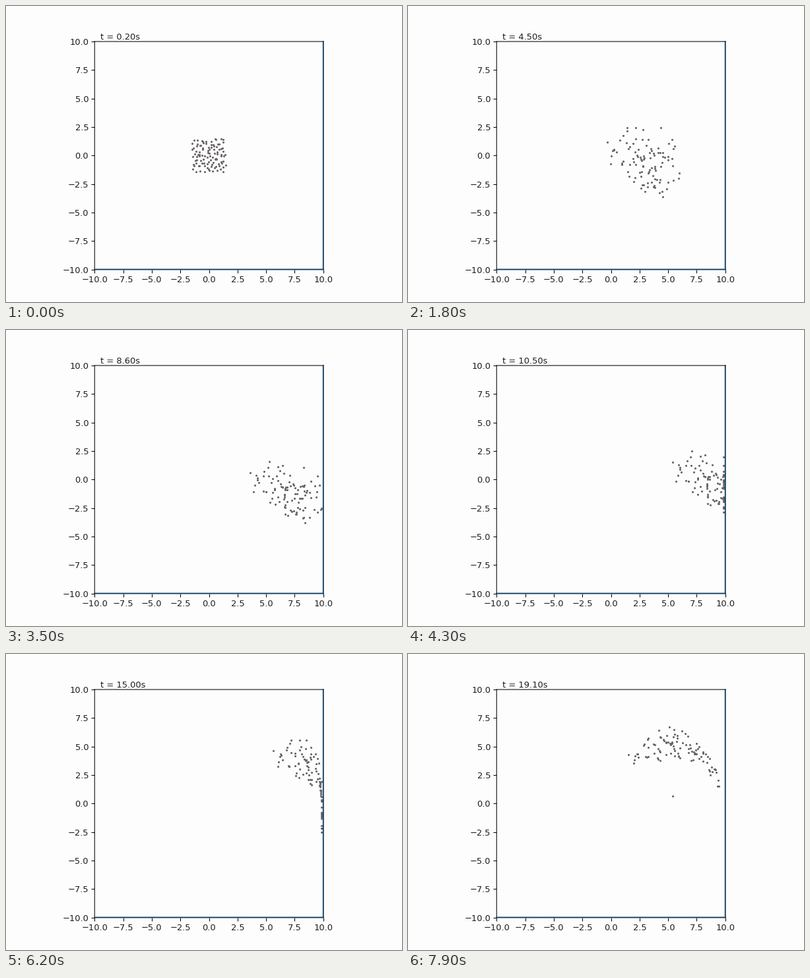
Recreate the animation shown at these times as a matplotlib script. Size 600 by 450 pixels, loop 8 s.

```python
import numpy as np
import matplotlib.pyplot as plt
from matplotlib.animation import FuncAnimation

FRAMES, INTERVAL = 80, 100
SIDE = 10          # birds start on a SIDE x SIDE jittered grid
WALL = 9.86
KEYS = np.array([0.2, 2.1, 6.9, 8.7, 10.5, 12.9, 14.9, 17.0, 19.1])


def xy(x, y):
    return np.stack([x, y], axis=1)


def make_poses(seed=12):
    """Flock position at each key time: burst, drift, hit the wall, peel off."""
    rng = np.random.default_rng(seed)
    n = SIDE * SIDE

    # Square block that bursts outwards
    g = np.linspace(-1.32, 1.32, SIDE)
    start = np.stack(np.meshgrid(g, g), axis=-1).reshape(-1, 2)
    start += rng.uniform(-0.14, 0.14, (n, 2))
    ang = rng.uniform(0, 2 * np.pi, n)
    rad = 1.5 * rng.random(n) ** 0.4
    q = (start + xy(rad * np.cos(ang), rad * np.sin(ang))) * [0.95, 1.27]
    burst = q + [1.0, -0.1]

    # Drift to the right, slightly sheared
    qx, qy = q.T
    noise = rng.normal(0, 0.18, (n, 2))
    drift = xy(5.1 + 1.25 * qx, -0.75 + 0.8 * qy - 0.25 * qx) + noise
    dip = drift + [1.8, -0.25]
    hit = drift + [3.5, 0.65]

    # The front sticks to the wall, the rest turns upwards
    stuck = hit[:, 0] > 9.45
    hx, hy = hit.T
    x = np.where(stuck, 10.1, 8.6 + 0.7 * (hx - 7.8))
    y = np.where(stuck, hy + 0.15 * (hy + 2.5), hy + 1.8)
    turn = xy(x, y)

    # Free birds fly off to the upper left, stuck ones trail behind
    a, b = (qx + 0.8) / 1.5, qy / 2.6
    f = np.clip((y + 2.5) / 5.5, 0, 1)
    free = xy(6.2 + 2.2 * a - 0.3 * b, 4.5 + 1.8 * b + 0.2 * a)
    tail = xy(9.9 - 2 * f**2 - rng.exponential(0.4, n),
              -0.8 + 5.8 * f**0.7 + rng.normal(0, 0.25, n))
    away = np.where(stuck[:, None], tail, free)
    peel = np.where(
        stuck[:, None],
        xy(9.95 - 0.6 * f**2, y + (0.15 + 0.3 * f) * (tail[:, 1] - y)),
        (turn + free) / 2 + [0.55, 0.35],
    )

    # Heading swings round along the arc
    k = away[:, 0] - away[:, 1] / 2
    head = np.radians(196 - 11.4 * (k - 1.7))
    end = away + 2.05 * xy(np.cos(head), np.sin(head))
    return np.array([start, burst, drift, dip, hit, turn, peel, away, end])


POSES = make_poses()
SLOPES = np.gradient(POSES, KEYS, axis=0)


def flock(t):
    """Cubic Hermite path through the poses, stopped by the wall."""
    t = min(t, KEYS[-1])
    i = min(np.searchsorted(KEYS, t, side="right") - 1, len(KEYS) - 2)
    h = KEYS[i + 1] - KEYS[i]
    u = (t - KEYS[i]) / h
    p = ((1 + 2 * u) * (1 - u) ** 2 * POSES[i]
         + u * (1 - u) ** 2 * h * SLOPES[i]
         + u * u * (3 - 2 * u) * POSES[i + 1]
         + u * u * (u - 1) * h * SLOPES[i + 1])
    p[:, 0] = np.minimum(p[:, 0], WALL)
    return p


plt.rcParams["font.family"] = "DejaVu Sans"
fig, ax = plt.subplots(figsize=(6.4, 4.8), dpi=93.75, facecolor="#fefdfe")
ax.set_facecolor("#fefdfe")
ax.set_aspect("equal")
ax.set(xlim=(-10, 10), ylim=(-10, 10))
ticks = np.arange(-10, 10.1, 2.5)
ax.set_xticks(ticks)
ax.set_yticks(ticks)
ax.tick_params(labelcolor="#1c1c1c")
for side, spine in ax.spines.items():
    spine.set_snap(False)
    if side in ("right", "bottom"):
        spine.set(color="#06395e", linewidth=1.4)

dots, = ax.plot([], [], "o", color="#6a6668", ms=2.4, mew=0)
clock = ax.text(-9.52, 10.2, "", color="#1c1c1c")


def update(i):
    t = (20 + 24 * i) // 10 / 10
    dots.set_data(*flock(t).T)
    clock.set_text(f"t = {t:.2f}s")
    return dots, clock


anim = FuncAnimation(fig, update, frames=FRAMES, interval=INTERVAL,
                     repeat=True, repeat_delay=0)
plt.show()
```
